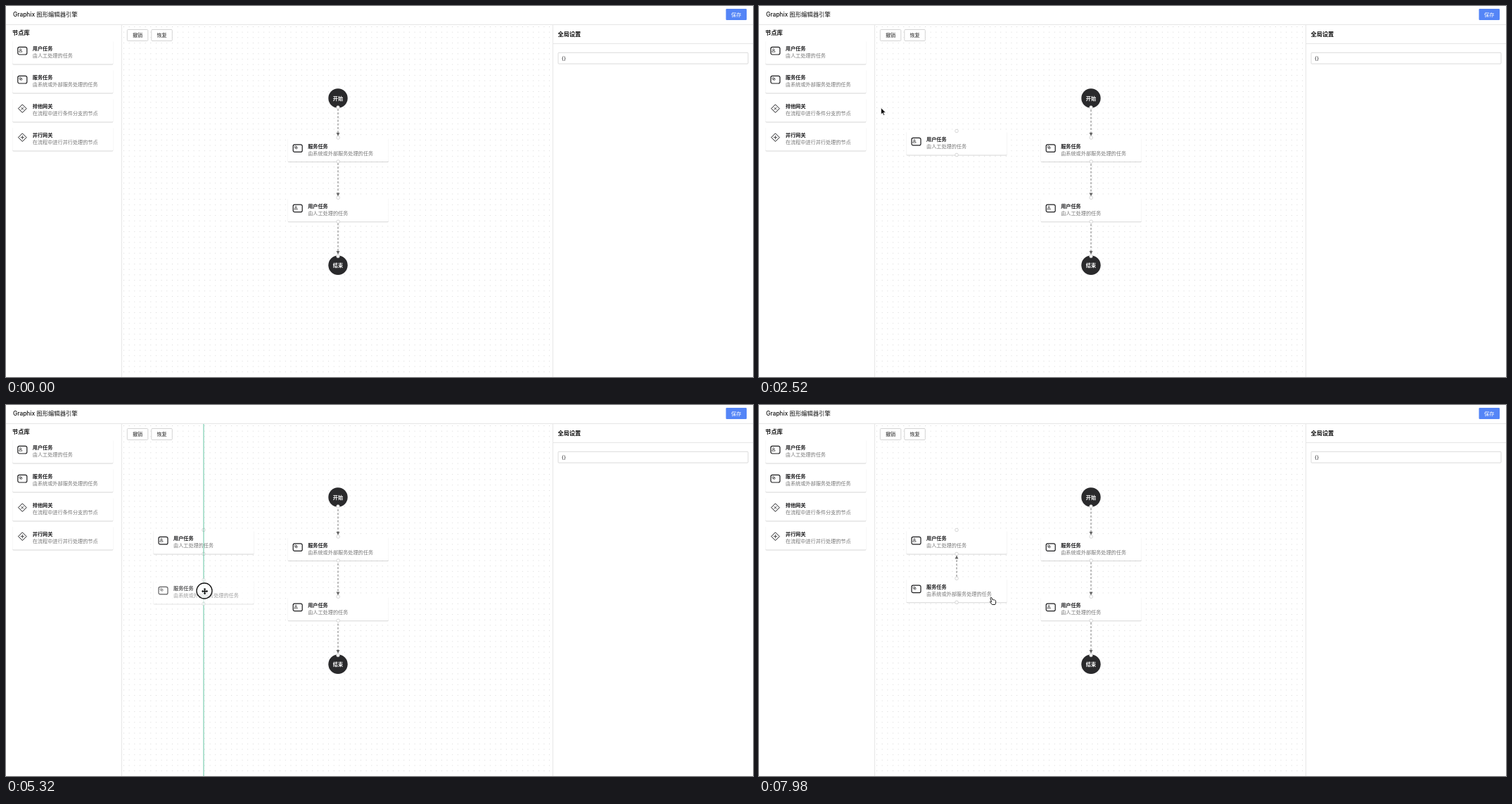
An HTML page for the animation above (8 s loop, 1062 by 527 pixels).

```html
<!DOCTYPE html>
<html lang="zh">
<head>
<meta charset="utf-8">
<style>
  html, body { margin: 0; width: 100%; height: 100%; overflow: hidden; background: #fff; }
  svg { display: block; width: 1062px; height: 527px; font-family: Inter, "Noto Sans CJK SC", "Noto Sans CJK", sans-serif; }
  .plate { fill: #fff; filter: drop-shadow(0 1.1px .6px rgba(0,0,0,.16)); }
  .icon { fill: none; stroke: #1d1d1f; stroke-width: 1.2; }
  .icon .fine { stroke-width: .6; }
  .icon .gate { stroke-width: 1; }
  .port { fill: #fff; stroke: #c4c4c4; stroke-width: .7; }
  .edge { fill: none; stroke: #777; stroke-width: 1; stroke-dasharray: 2.9 2.3; }
  .arrow { fill: #666; }
  .box { fill: #fff; stroke: #d2d2d2; stroke-width: .8; }
  .rule { stroke: #e6e6e6; stroke-width: 1; }
  .guide { stroke: #63c4a1; stroke-width: 1; }
</style>
</head>
<body>
<svg id="stage" viewBox="0 0 1062 527"></svg>
<script>
const LOOP = 8000, STEP = 70, LAG = 140, SNAP = 4;
const CARD_W = 143, CARD_H = 34, LANE = 281;
const stage = document.getElementById('stage');

const text = (x, mid, size, str, fill = '#1d1d1f', weight = 400, anchor = 'start') =>
  `<text x="${x}" y="${mid + size * .36}" font-size="${size}" fill="${fill}" font-weight="${weight}" text-anchor="${anchor}">${str}</text>`;
const line = (x1, y1, x2, y2, cls, id = '') =>
  `<line class="${cls}" id="${id}" x1="${x1}" y1="${y1}" x2="${x2}" y2="${y2}"/>`;
const rect = (x, y, w, h, r, attrs = '') => `<rect x="${x}" y="${y}" width="${w}" height="${h}" rx="${r}" ${attrs}/>`;
const group = (id, body, attrs = '') => `<g id="${id}" ${attrs}>${body}</g>`;
const port = (x, y) => `<circle class="port" cx="${x}" cy="${y}" r="2.3"/>`;

const task = glyph => rect(-6.5, -5.3, 13, 10.6, 2.2) + `<g class="fine">${glyph}</g>`;
const gateway = arms => `<g class="gate"><path d="M0-5.8L5.8 0L0 5.8L-5.8 0Z"/><path stroke-width=".8" d="${arms}"/></g>`;
const kinds = {
  user: ['用户任务', '由人工处理的任务',
    task('<circle cx="-2.6" cy="-1.9" r="1.2"/><path d="M-4.9 1.6Q-4.6-.5-2.6-.6Q-.6-.5-.3 1.6Z"/>')],
  service: ['服务任务', '由系统或外部服务处理的任务',
    task('<circle cx="-3" cy="-1.8" r="1.5"/><circle cx="-1.7" cy="-.6" r="1.4"/>')],
  exclusive: ['排他网关', '在流程中进行条件分支的节点', gateway('M-1.8-1.8L1.8 1.8M1.8-1.8L-1.8 1.8')],
  parallel: ['并行网关', '在流程中进行并行处理的节点', gateway('M-2.6 0H2.6M0-2.6V2.6')]
};

function card(kind, x, y, ports = true) {
  const [title, note, icon] = kinds[kind];
  return `<g transform="translate(${x} ${y})">` +
    rect(0, 0, CARD_W, CARD_H, 1.5, 'class="plate"') +
    `<g class="icon" transform="translate(14 15.1)">${icon}</g>` +
    text(28.5, 12, 7.15, title, '#1d1d1f', 700) + text(28.5, 22, 7.15, note, '#777') +
    (ports ? port(CARD_W / 2, 0) + port(CARD_W / 2, CARD_H) : '') + '</g>';
}

const terminal = (y, label, portY) =>
  `<circle cx="472" cy="${y}" r="13.7" fill="#2a2a2c"/>` +
  text(472, y, 7.15, label, '#fff', 700, 'middle') + port(472, portY);

function edge(x, y1, y2) {
  const d = Math.sign(y2 - y1), tip = y2 - 2 * d, base = tip - 5 * d;
  return line(x, y1 + 2 * d, x, base, 'edge') +
    `<path class="arrow" d="M${x} ${tip}L${x - 2.4} ${base}H${x + 2.4}Z"/>`;
}

const button = (x, y, label, fill, stroke, color) =>
  rect(x, y, 29.5, 16, 1.2, `fill="${fill}" stroke="${stroke}" stroke-width=".8"`) +
  text(x + 14.75, y + 8, 7.15, label, color, 400, 'middle');

const cursors = {
  arrow: '<path d="M0 0V9.5L2.2 7.5L3.7 10.8L5.2 10.1L3.8 7H6.8Z" fill="#111" stroke="#fff" stroke-width=".7"/>',
  move: '<path transform="translate(.6 .6)" d="M0-4.6L1.9-2.6H.8V-.8H2.6V-1.9L4.6 0L2.6 1.9V.8H.8V2.6H1.9L0 4.6L-1.9 2.6H-.8V.8H-2.6V1.9L-4.6 0L-2.6-1.9V-.8H-.8V-2.6H-1.9Z" fill="#111"/>',
  cross: '<circle r="2.6" fill="#fff"/><path d="M-4 .2H4M0-3.8V4.2" stroke="#222" stroke-width="1"/>',
  hand: '<path d="M-.8-.3Q.2-1.2 1 0L2.2 3L2.7 2.4L3.8 3L4.4 2.6L5.4 3.4Q6.5 3.2 6.6 4.6V7L5.7 9.5H1.4L-1.5 5.8Q-1.6 4.7-.3 5.1L.6 5.8L-.9 1Q-1.2 .2-.8-.3Z" fill="#fff" stroke="#222" stroke-width="1" stroke-linejoin="round"/>'
};

stage.innerHTML =
  `<defs><pattern id="dots" x="167" y="29" width="7.66" height="7.66" patternUnits="userSpaceOnUse">
    <rect width="1" height="1" fill="#d6d6d6"/></pattern></defs>` +
  rect(165, 27, 612, 500, 0, 'fill="url(#dots)"') +
  line(0, 26.5, 1062, 26.5, 'rule') + line(164.5, 27, 164.5, 527, 'rule') +
  line(777.5, 27, 777.5, 527, 'rule') + line(778, 53.5, 1062, 53.5, 'rule') +
  text(10, 12, 8.35, 'Graphix 图形编辑器引擎', '#111', 500) +
  button(1023.5, 4, '保存', '#5485f7', 'none', '#fff') +
  text(9, 37.7, 8.2, '节点库', '#111', 600) +
  Object.keys(kinds).map((kind, i) => card(kind, 9.3, 48.6 + 41 * i, false)).join('') +
  button(172.3, 33.5, '撤销', '#fff', '#c9c9c9', '#222') +
  button(206.8, 33.5, '恢复', '#fff', '#c9c9c9', '#222') +
  text(784.5, 40.3, 8.2, '全局设置', '#111', 700) +
  rect(785, 66.3, 270, 15.8, 1, 'class="box"') + text(790, 74.3, 7.15, '{}') +
  edge(472, 144, 187) + edge(472, 221, 272.5) + edge(472, 306.5, 355) +
  card('service', 400.7, 187) + card('user', 400.7, 272.3) +
  terminal(131, '开始', 144) + terminal(368.3, '结束', 355.5) +
  group('link', edge(LANE, 246.3, 211.5)) +
  group('user', card('user', 209.5, 177.5)) + group('service', card('service', 209.5, 246.3)) +
  line(LANE, 245, LANE, 245, 'edge', 'preview') +
  line(165, 0, 777, 0, 'guide', 'guideH') + line(LANE, 27, LANE, 527, 'guide', 'guideV') +
  ['user', 'service'].map(kind => group(kind + 'Ghost', card(kind, 0, 0), 'opacity=".7"')).join('') +
  group('pointer',
    '<circle id="press" r="11" fill="#fff" fill-opacity=".6" stroke="#111" stroke-width="1.3"/>' +
    Object.entries(cursors).map(([name, body]) => group(name, body)).join(''));

const $ = id => document.getElementById(id);
const show = (id, on) => { $(id).style.display = on ? '' : 'none'; };
const place = (id, x, y) => $(id).setAttribute('transform', `translate(${x} ${y})`);
const edges = document.querySelectorAll('.edge');

// Stops of the pointer and the shape it has from there on
const stops = [
  { t: 210, x: 300, y: 355, shape: 'arrow' },
  { t: 910, x: 90, y: 72, shape: 'move' },
  { t: 1610, x: 168.7, y: 102.5, shape: 'move' },
  { t: 1750, x: 227.5, y: 140.5, shape: 'move' },
  { t: 2030, x: LANE, y: 193, shape: 'move' },
  { t: 2310, x: LANE, y: 193, shape: 'arrow' },
  { t: 2800, x: 30, y: 80, shape: 'arrow' },
  { t: 3430, x: 88.5, y: 109, shape: 'move' },
  { t: 3570, x: 89, y: 109, shape: 'move' },
  { t: 4270, x: 262.5, y: 256.5, shape: 'move' },
  { t: 5180, x: 282, y: 264, shape: 'move' },
  { t: 5880, x: 282, y: 264, shape: 'arrow' },
  { t: 6790, x: LANE, y: 247.5, shape: 'cross' },
  { t: 7000, x: LANE, y: 247.5, shape: 'cross' },
  { t: 7490, x: LANE, y: 212, shape: 'hand' },
  { t: 7910, x: 330, y: 274, shape: 'hand' }
];
const drags = [
  { id: 'user', from: 910, to: 2240 },
  { id: 'service', from: 3430, to: 5880 },
  { id: 'link', from: 7000, to: 7490 }
];
// Tops and bottoms of the nodes in the flow
const levels = [118.3, 144.7, 187, 221, 272.2, 306.5];

function pointerAt(t) {
  const i = Math.max(0, stops.findLastIndex(stop => stop.t <= t));
  const a = stops[i], b = stops[i + 1] || a;
  const k = a === b ? 0 : Math.max(0, (t - a.t) / (b.t - a.t));
  return { x: a.x + (b.x - a.x) * k, y: a.y + (b.y - a.y) * k, shape: a.shape };
}

// The dragged card trails the pointer and snaps to the lane
function ghostAt(t) {
  const { x, y } = pointerAt(t - LAG);
  const snapped = Math.abs(x - LANE) < SNAP;
  return { x: (snapped ? LANE : x) - CARD_W / 2, y: y + 1.5 - CARD_H / 2, snapped };
}

function render(now) {
  const t = Math.floor(now % LOOP / STEP) * STEP;
  const pointer = pointerAt(t), ghost = ghostAt(t);
  const held = drags.find(d => t >= d.from && t < d.to);
  const carrying = held && held.id !== 'link' && t >= held.from + LAG;

  edges.forEach(e => e.setAttribute('stroke-dashoffset', -t * .017));
  drags.forEach(d => show(d.id, t >= d.to));
  ['user', 'service'].forEach(id => {
    show(id + 'Ghost', carrying && held.id === id);
    place(id + 'Ghost', ghost.x, ghost.y);
  });

  const level = levels.find(y => [ghost.y, ghost.y + CARD_H].some(side => Math.abs(side - y) < SNAP));
  show('guideH', carrying && level);
  if (level) place('guideH', 0, level);
  show('guideV', carrying && held.id === 'service' && ghost.snapped);

  show('preview', held && held.id === 'link');
  $('preview').setAttribute('x2', pointer.x);
  $('preview').setAttribute('y2', pointer.y);

  show('pointer', t >= stops[0].t);
  place('pointer', pointer.x, pointer.y);
  show('press', held);
  Object.keys(cursors).forEach(name => show(name, name === pointer.shape));
}

const start = performance.now();
function tick() {
  render(performance.now() - start);
  requestAnimationFrame(tick);
}
tick();
</script>
</body>
</html>
```
